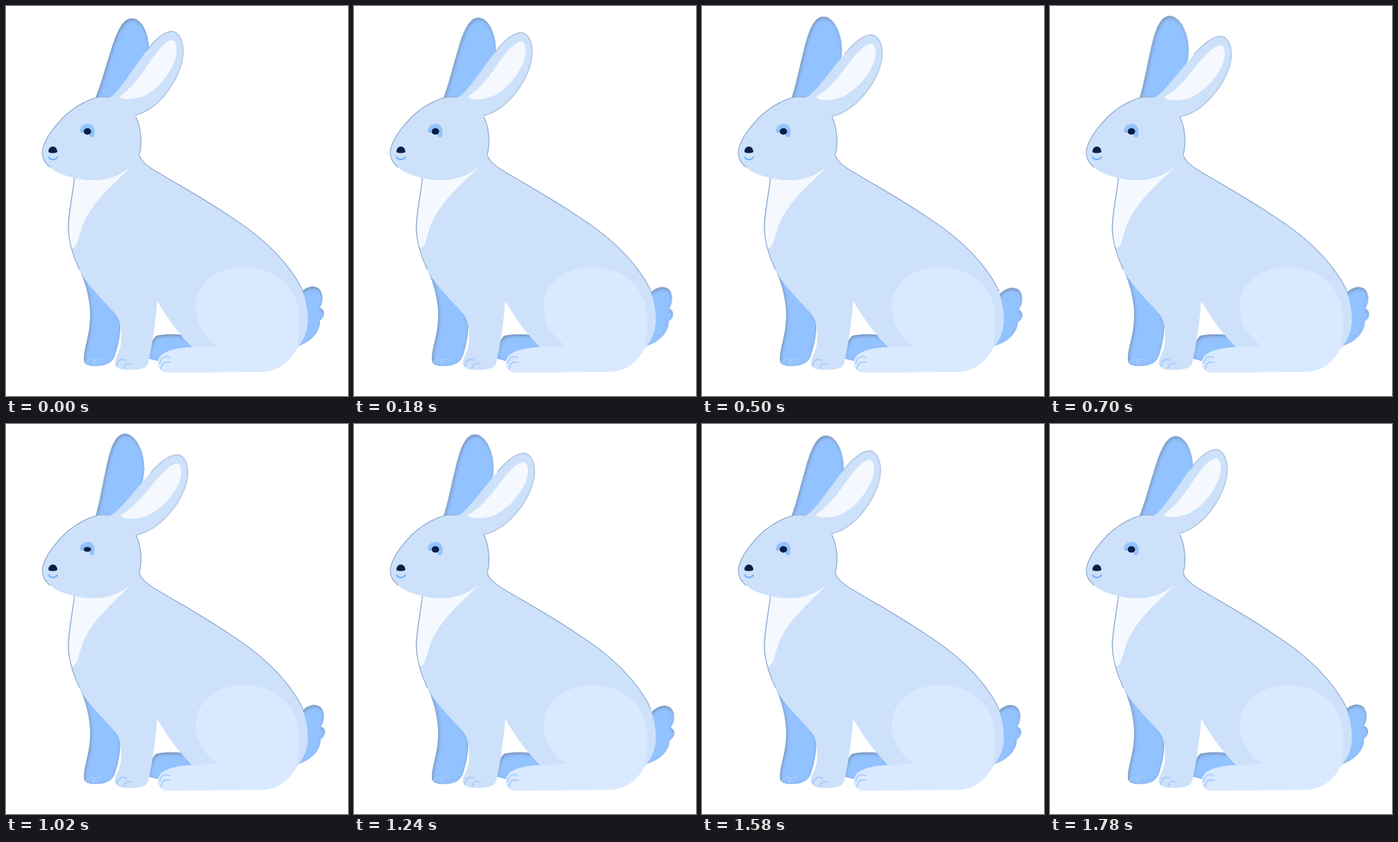
An HTML page without scripts for the animation above (1.8 s loop, 500 by 569 pixels).

```html
<!DOCTYPE html>
<html lang="en">
<head>
<meta charset="utf-8">
<title>Rabbit</title>
<style>
html, body { margin: 0; width: 100%; height: 100%; overflow: hidden; background: #fff; }
svg { display: block; width: 100vw; height: 100vh; }

.fur { fill: #cde1fa; }
.far { fill: #92c2ff; filter: url(#shade); }
.pale { fill: #f5f9ff; }
.haunch { fill: #d9e9ff; }
.dark { fill: #082047; }
.line { fill: none; stroke-linecap: round; }
.rim { stroke: #93abd0; stroke-width: 1.3; }
.toes { stroke: #a5cbfd; stroke-width: 1.8; }

.far-ear, .near-ear, .tail, .pupil { animation: 1.8s linear infinite; }
.far-ear { transform-origin: 140px 135px; animation-name: lean-left; }
.near-ear { transform-origin: 155px 145px; animation-name: lean-right; }
.tail { transform-origin: 430px 490px; animation-name: wag; }
.pupil { transform-origin: 119px 183px; animation-name: blink; }

@keyframes lean-left { 50% { transform: rotate(-6.4deg); } }
@keyframes lean-right { 50% { transform: rotate(5.8deg); } }
@keyframes wag {
  0%, 48.5%, 100% { transform: rotate(0deg); }
  25.5%, 72% { transform: rotate(5.6deg); }
}
@keyframes blink {
  0%, 45%, 58%, 100% { transform: scaleY(1); }
  51%, 53% { transform: scaleY(.08); }
}
</style>
</head>
<body>
<svg viewBox="0 0 500 569" preserveAspectRatio="none">
  <!-- soft shadow inside the upper left edge -->
  <filter id="shade" x="-20%" y="-20%" width="140%" height="140%" color-interpolation-filters="sRGB">
    <feFlood flood-color="#71839c" flood-opacity=".85"/>
    <feComposite in2="SourceAlpha" operator="out"/>
    <feGaussianBlur stdDeviation="2.5"/>
    <feOffset dx="1" dy="2"/>
    <feComposite in2="SourceAlpha" operator="in" result="edge"/>
    <feMerge><feMergeNode in="SourceGraphic"/><feMergeNode in="edge"/></feMerge>
  </filter>

  <g class="tail">
    <path class="far" d="M426 424C434 412 445 407 453 410C464 413 465 431 459 440C467 444 467 453 459 459C460 475 446 490 428 496Z"/>
  </g>

  <!-- far legs -->
  <path class="far" d="M207 514C210 500 212 487 220 481C235 478 248 479 260 480L280 502L240 520L222 518Z"/>
  <path class="far" d="M105 379C116 402 124 430 123 455C122 485 113 500 114 517C115 525 125 526 137 525C150 524 157 518 160 508C164 495 168 480 167 460L150 425Z"/>
  <path class="line toes" d="M117 522C119 515 125 514 130 517M127 523C129 516 135 514 139 516"/>

  <!-- body -->
  <path class="fur" d="M100 248C97 280 91 300 91 325C92 350 104 381 115 398C129 418 149 436 161 451C169 463 169 480 168 492C166 507 159 512 159 522C161 530 170 531 180 531C195 531 205 529 208 521C214 495 219 460 221 430C238 460 256 482 274 500L400 520L411 517L426 499C442 480 443 460 440 441C437 420 430 405 415 384.500C395 357.500 365 331 330 308.500C285 278 245 257 215 238.500C203 230.500 197 225 194 216Z"/>
  <path class="line rim" d="M434 416C430 405 424 397 415 384.500C395 357.500 365 331 330 308.500C285 278 245 257 215 238.500C203 230.500 197 225 194 216"/>
  <path class="pale" d="M101 248C98 280 92.500 305 92.500 325C92.500 340 94 352 98 353C104 352 106 338 110 326C123 287 154 264 182 235L150 240Z"/>
  <path class="line rim" d="M100 250C97 280 91 300 91 325C92 348 100 369 107 384"/>
  <path class="line toes" d="M162 525C164 515 170 514 176 517M173 528C174 521 180 520 185 523"/>

  <path class="haunch" d="M310 496C285 478 277 458 277 438C278 404 310 381 348 381C395 381 429 412 429 458C429 475 427 489 425 500C414 518 402 534 368 534C330 534 280 535 236 535C225 534 221 528 222 519C224 506 240 500 265 498Z"/>
  <path class="line toes" d="M225 521C227 512 233 510 239 513M227 529C228 520 233 518 240 520"/>

  <!-- head -->
  <g class="far-ear">
    <path class="far" d="M130 136C138 118 145 90 153 66C161 40 170 18 184 18C199 18 210 42 209 66C208 95 190 120 170 142Z"/>
  </g>
  <g class="near-ear">
    <path class="fur" d="M152 134C168 122 185 92 205 66C220 46 232 37 243 37C254 38 260 54 259 70C257 95 242 120 225 138C213 150 200 157 188 160L160 165Z"/>
    <path class="line rim" stroke-opacity=".7" d="M205 66C220 46 232 37 243 37C254 38 260 54 259 70C257 95 242 120 225 138C213 150 200 157 188 160"/>
    <path class="pale" d="M167.500 131C179 123 191 110 204 91C216 73 230 51 243 50C249 51 251 62 248 75C243 93 227 117 206 129C195 135 178 137 170 135C166 134 166 132 167.500 131Z"/>
  </g>
  <path class="fur" d="M152 133C128 128 95 148 76 171C62 187 53 203 53 215C53 228 66 240 86 247C106 254 135 258 158 249C173 243 188 232 194 219C200 202 198 176 188 158Z"/>
  <path class="line rim" d="M150 133C128 129 95 148 76 171C62 187 53 203 53 215C53 222 57 229 64 235M190 162C198 178 199 202 195 216"/>

  <!-- face -->
  <path class="line" d="M111.500 181.500C113 175 122 173.500 125 179C127 182 126 185 125.500 188" stroke="#92c2ff" stroke-width="7"/>
  <ellipse class="pupil dark" cx="119" cy="183" rx="5.500" ry="4.700"/>
  <path class="dark" d="M62 213C62 208 65 205 68.500 205C72 205 75 208 75 213C72 215 65 215 62 213Z"/>
  <path class="line" d="M62.500 220.500C65 225 72 225 75 220.500" stroke="#69abfa" stroke-width="2"/>
</svg>
</body>
</html>
```
